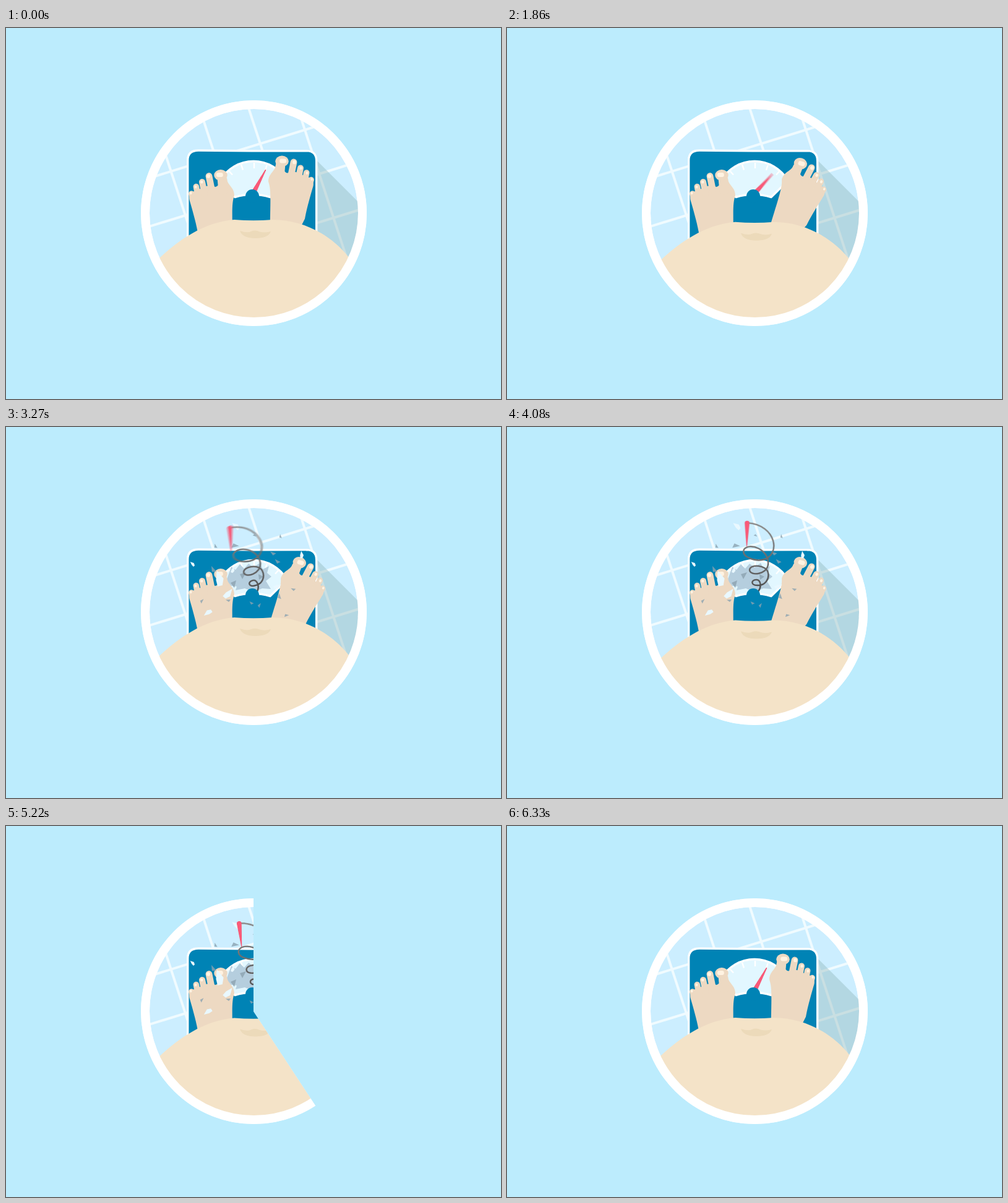
Write an HTML page that moves like this. It is 800 by 600 pixels and loops after 6.36 s.

```html
<!DOCTYPE html>
<html lang="en">
<head>
<meta charset="utf-8">
<title>Bathroom scale</title>
<style>
  html, body { margin: 0; width: 100%; height: 100%; overflow: hidden; background: #bcecfd; }
  svg { display: block; width: 800px; height: 600px; }
  .blur { isolation: isolate; }
  .blur use { mix-blend-mode: plus-lighter; opacity: .101; }
  .tiles { stroke: #f0fbff; stroke-width: 4; }
  .skin { fill: #edd9c2; }
  .toes { stroke: #edd9c2; stroke-linecap: round; }
  .nails { fill: #fff3e2; }
  .red { fill: #f1506f; }
</style>
</head>
<body>
<svg viewBox="0 0 800 600">
  <defs>
    <clipPath id="disc"><circle cx="400.5" cy="299.5" r="170"/></clipPath>
    <clipPath id="wipe"><path id="sector"/></clipPath>
    <linearGradient id="wire" gradientUnits="userSpaceOnUse" x1="0" y1="265" x2="0" y2="155">
      <stop offset="0" stop-color="#484848"/>
      <stop offset="1" stop-color="#8a8a8a"/>
    </linearGradient>

    <path id="needle" class="red" d="M-4.2 0L-.7-46Q0-47 .7-46L4.2 0Z"/>
    <path id="spring" fill="none" stroke="url(#wire)" stroke-width="2.4" d="M406 266C412 258 410 247 403 247C394 247 394 256 404 256
      C418 257 424 245 422 236C420 223 393 221 392 231C392 241 420 240 422 222
      C424 198 392 186 383 198C378 210 400 217 412 215C444 209 436 158 388 155"/>
    <path id="tip" class="red" d="M384.2 155.5A3.8 3.8 0 0 1 391.8 155.5L388.6 193H387.6Z"/>

    <g id="foot">
      <path class="skin" d="M318 370L316 343L310 331C306 310 301 294 296.5 278C295 270 299 266 304 264L312 261L322 256L334 254
        Q338 260 343 254L357 243C357 254 369 257 369 271C364 285 366 300 366.5 370Z"/>
      <g class="toes">
        <path stroke-width="9.5" d="M299.8 268L304 280M307.3 256.5L311 275"/>
        <path stroke-width="10" d="M317 249L321 268"/>
        <path stroke-width="10.8" d="M328 239.5L332.5 262"/>
        <path stroke-width="15.5" d="M349.5 245L351 262"/>
      </g>
      <ellipse class="skin" cx="347" cy="238" rx="10.8" ry="9"/>
      <g class="nails">
        <rect x="339.8" y="234" width="11" height="7" rx="3.2"/>
        <ellipse cx="327" cy="239.5" rx="3" ry="3.2"/>
        <ellipse cx="316.3" cy="249" rx="2.3" ry="2.6"/>
        <ellipse cx="306.5" cy="257" rx="2" ry="2.4"/>
        <ellipse cx="298.7" cy="267" rx="1.8" ry="2.2"/>
      </g>
    </g>
  </defs>

  <g id="scene">
    <circle cx="400.5" cy="299.5" r="182.5" fill="#fff"/>
    <circle cx="400.5" cy="299.5" r="168.5" fill="#cceeff"/>
    <g clip-path="url(#disc)">
      <g id="floor" class="tiles"></g>
      <path fill="#90b5b7" fill-opacity=".4" d="M500 212L600 312V480H480Z"/>

      <path fill="#0083b5" stroke="#fff" stroke-width="3.4"
        d="M293.7 380V214Q293.7 198 311 198L398 198.8L486 198.6Q501.7 199 501.7 215V380Z"/>
      <path fill="#e2f7ff" stroke="#fff" stroke-width="3.4" stroke-linejoin="round"
        d="M346 247A62 62 0 0 1 454 247L427 273.5Q398 265 370 273.5Z"/>
      <path stroke="#fff" stroke-width="2.4" d="M361 232L366 237.5M380 221L383 229.5M401 218V227M421.5 222L419 230M440 232L435 237.5"/>
      <g id="hole">
        <path fill="#b5cede" d="M357 246L364 226L371 231L378 222L385 229L392 221L400 227L410 220L415 230L425 225L422 236
          L429 242L420 249L428 262L414 261L400 267L386 261L371 264L373 258L358 256Z"/>
        <path fill="#94abb9" d="M378 238L388 235L382 246ZM363 252L372 248L369 260ZM408 238L416 242L409 247Z"/>
      </g>
      <g id="dialNeedle" class="blur"></g>

      <use href="#foot"/>
      <g id="rightFoot"><use href="#foot" transform="translate(793 -22.5) scale(-1 1)"/></g>
      <g id="shards"></g>
      <g id="springs" class="blur"></g>
      <g id="tips" class="blur"></g>
      <circle cx="398" cy="272" r="11" fill="#0083b5"/>

      <g id="belly">
        <path fill="#f4e3c8" d="M215 412L249 371C270 352 314 314 369 310Q400 312.5 431 310C480 310 526 335 554 371L586 412V510H215Z"/>
        <path fill="#ecdaba" d="M378 328Q390 332 396 329Q403 326 410 329.5Q418 332 428 329Q424 340 403 340Q382 340 378 328Z"/>
      </g>
    </g>
    <circle cx="400.5" cy="299.5" r="175.5" fill="none" stroke="#fff" stroke-width="14"/>
  </g>
</svg>

<script>
const LOOP = 6360, STEP = 30;
const BREAK = 2760, RESET = 5555;
const OUT = [4760, 5540], IN = [5570, 5940];
const GHOSTS = 10, SHUTTER = 13;
const TAU = 2 * Math.PI;

const $ = id => document.getElementById(id);
const clamp = x => Math.min(1, Math.max(0, x));
const part = (t, [a, b]) => clamp((t - a) / (b - a));
const smooth = p => p * p * (3 - 2 * p);
const mix = (a, b, p) => a + (b - a) * p;

function add(parent, tag, attrs) {
  const el = document.createElementNS('http://www.w3.org/2000/svg', tag);
  for (const k in attrs) el.setAttribute(k, attrs[k]);
  return parent.appendChild(el);
}
const move = (el, value) => el.setAttribute('transform', value);
const show = (id, on) => { $(id).style.display = on ? '' : 'none'; };

// Floor grid
for (let i = 0; i < 4; i++) {
  const x = 240 + 79.4 * i, y = 190.5 + 78.3 * i;
  add($('floor'), 'path', { d: `M${x - 16.3} 100L${x + 97.8} 450` });
  if (i < 3) add($('floor'), 'path', { d: `M200 ${y + 62}L600 ${y - 62}` });
}

const ghosts = (id, href) =>
  Array.from({ length: GHOSTS }, () => add($(id), 'use', { href }));
const needles = ghosts('dialNeedle', '#needle');
const springs = ghosts('springs', '#spring');
const tips = ghosts('tips', '#tip');

// Glass and metal pieces: x, y, size, turn
const glass = [
  [301, 222, 4.5, 20], [343, 246, 12, 50], [358, 269, 9, 105], [327, 301, 7, 300],
  [371, 161, 7, 15], [477, 207, 5.5, 60], [366, 231, 5, 80], [438, 257, 6, 130]
];
const metal = [
  [334, 231, 6, 50], [370, 191, 6.5, 170], [431, 205, 5, 20], [443, 177, 3.5, 70],
  [464, 263, 4, 10], [453, 304, 4, 160], [441, 274, 5, 75], [316, 281, 4, 120],
  [359, 281, 4, 0], [396, 285, 4, 30], [409, 288, 4, 110], [338, 193, 4, 60],
  [438, 218, 5, 30], [402, 175, 3, 200]
];
const piece = (fill, d) => ([x, y, size, turn]) =>
  ({ x, y, size, turn, el: add($('shards'), 'path', { d, fill }) });
const shards = [
  ...glass.map(piece('#e9f8ff', 'M-1-.6L.4-.6L1 .1L.7 .7L-.1 .3Z')),
  ...metal.map(piece('#8ba3b0cc', 'M-1-.4L1-.5L.3 .5Z'))
];

function needleAngle(t) {
  if (t >= RESET) return mix(-50, 28, smooth(part(t, [5850, 6300])));
  if (t < 650) return mix(28, 34, smooth(part(t, [0, 600])));
  const swing = (t - 650) * .0135;
  return 34 + .67 * swing - swing * Math.cos(TAU * (t - 990) / 230.5);
}

const springPhase = t => TAU * (t - 3270) / 720 - .37;
const springAngle = t => -4 + 28 * Math.exp(-.00127 * (t - 3270)) * Math.sin(springPhase(t));
// The hanging tip trails behind the swing
const tipAngle = t => 12 * Math.exp(-.003 * Math.max(0, t - 3270)) * Math.cos(springPhase(t));

function springScale(t) {
  const u = Math.max(0, t - BREAK);
  return 1 - Math.exp(-u / 100) * Math.cos(u / 90);
}

const bellyShift = t => .9 - 2.9 * Math.cos(TAU * (t - 525) / 2640);

function setWipe(t) {
  const from = t < RESET ? Math.pow(part(t, OUT), 1.7) : 0;
  const to = t < RESET ? 1 : 1 - Math.pow(1 - part(t, IN), 1.7);
  show('scene', to > from);
  if (to - from >= 1) return $('scene').removeAttribute('clip-path');
  const rim = p => `${400 + 400 * Math.sin(TAU * p)} ${300 - 400 * Math.cos(TAU * p)}`;
  $('sector').setAttribute('d',
    `M400 300L${rim(from)}A400 400 0 ${to - from > .5 ? 1 : 0} 1 ${rim(to)}Z`);
  $('scene').setAttribute('clip-path', 'url(#wipe)');
}

function draw(t) {
  const broken = t >= BREAK && t < RESET;
  for (const id of ['hole', 'shards', 'springs', 'tips']) show(id, broken);
  show('dialNeedle', !broken);

  for (let i = 0; i < GHOSTS; i++) {
    const at = t + SHUTTER * (i / (GHOSTS - 1) - .5);
    if (broken) {
      const pose = `translate(405 265) rotate(${springAngle(at)}) scale(${springScale(at)}) translate(-405 -265)`;
      move(springs[i], pose);
      move(tips[i], `${pose} rotate(${tipAngle(at)} 388 155)`);
    } else {
      move(needles[i], `translate(398 270) rotate(${needleAngle(at)})`);
    }
  }

  if (broken) {
    const q = 1 - Math.pow(1 - part(t, [BREAK, BREAK + 420]), 3);
    for (const s of shards) {
      const x = mix(400, s.x, q), y = mix(245, s.y, q);
      move(s.el, `translate(${x} ${y}) rotate(${s.turn - 200 * (1 - q)}) scale(${s.size})`);
    }
  }

  const turn = t < RESET ? 16 * smooth(part(t, [30, 600])) : 0;
  move($('rightFoot'), `rotate(${turn} 447 318)`);
  move($('belly'), `translate(0 ${bellyShift(t)})`);
  setWipe(t);
}

const start = performance.now();
function tick() {
  const t = (performance.now() - start) % LOOP;
  draw(Math.floor(t / STEP) * STEP);
  requestAnimationFrame(tick);
}
tick();
</script>
</body>
</html>
```
